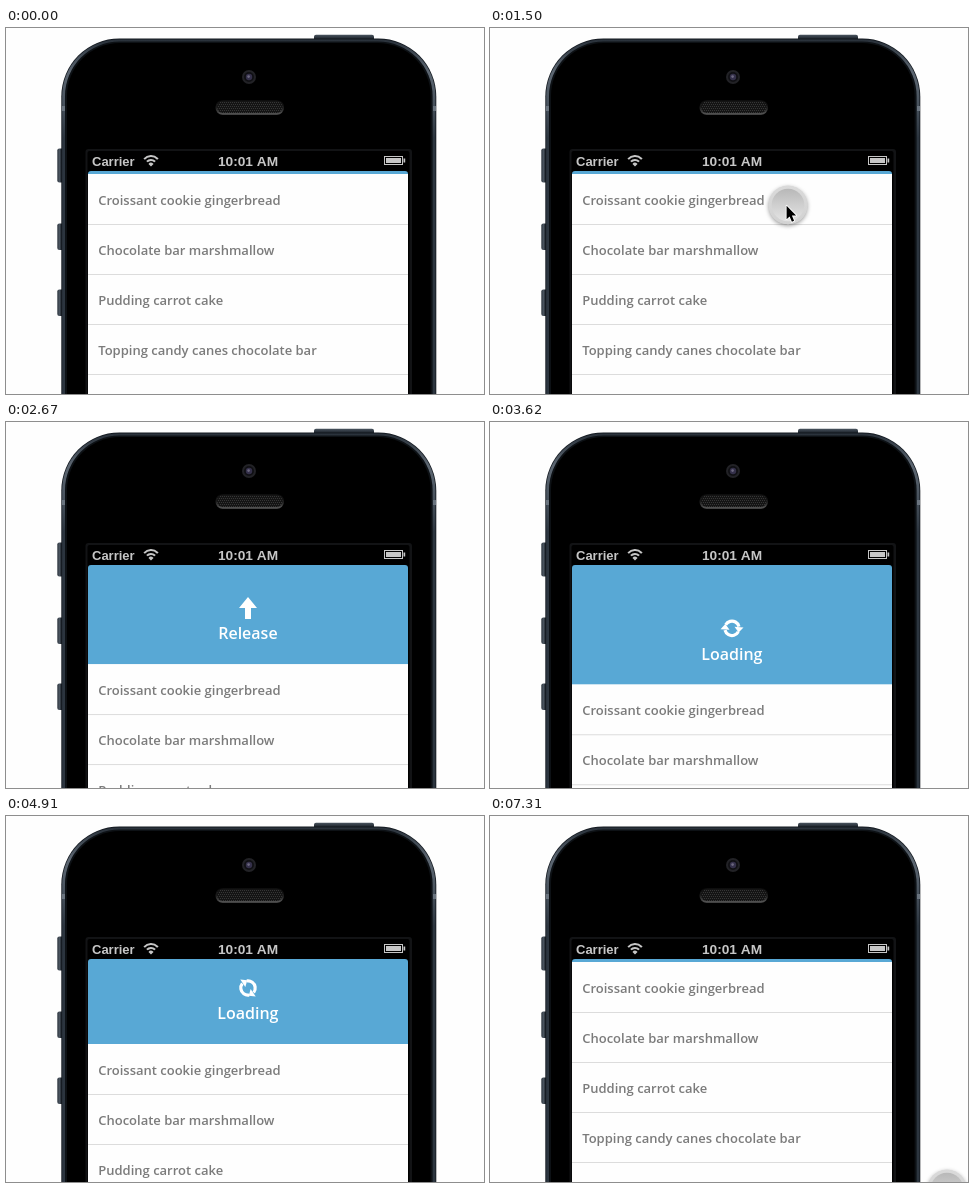
Animation of 478x366 px, one loop 7420 ms. Source, as an HTML page with a canvas:

```html
<!DOCTYPE html>
<html lang="en">
<head>
<meta charset="utf-8">
<title>Pull to refresh</title>
<style>
  html, body { margin: 0; width: 100%; height: 100%; overflow: hidden; background: #fefefe; }
  canvas { display: block; width: 478px; height: 366px; }
</style>
</head>
<body>
<canvas id="stage"></canvas>
<script>
const W = 478, H = 366, LOOP = 7420;
const BLUE = '#58a8d5', TAU = Math.PI * 2;
const REST = 82, MAX_PULL = 129.5;
const PULL = 1830, PULLED = 2900, RELEASE = 3470, CLOSE = 4980, SETTLE = 785;
const ROWS = [
  'Croissant cookie gingerbread',
  'Chocolate bar marshmallow',
  'Pudding carrot cake',
  'Topping candy canes chocolate bar',
  ''
];

const canvas = document.getElementById('stage');
const dpr = window.devicePixelRatio || 1;
canvas.width = W * dpr;
canvas.height = H * dpr;
const screenCtx = canvas.getContext('2d');
let c = screenCtx;

const clamp = (v, a = 0, b = 1) => Math.min(b, Math.max(a, v));
const mix = (a, b, p) => a + (b - a) * p;

// cubic-bezier(.25, .1, .25, 1)
function ease(x) {
  x = clamp(x);
  const curve = (a, b, s) => 3 * a * s * (1 - s) ** 2 + 3 * b * s * s * (1 - s) + s ** 3;
  let lo = 0, hi = 1;
  for (let i = 0; i < 24; i++) {
    const mid = (lo + hi) / 2;
    if (curve(0.25, 0.25, mid) < x) lo = mid; else hi = mid;
  }
  return curve(0.1, 1, lo);
}

function rounded(x, y, w, h, r, fill) {
  c.beginPath();
  c.roundRect(x, y, w, h, r);
  c.fillStyle = fill;
  c.fill();
}

function disc(x, y, r, fill) {
  c.beginPath();
  c.arc(x, y, r, 0, TAU);
  c.fillStyle = fill;
  c.fill();
}

function shape(points, fill) {
  c.beginPath();
  points.forEach(([x, y]) => c.lineTo(x, y));
  c.closePath();
  c.fillStyle = fill;
  c.fill();
}

function ramp(x0, y0, x1, y1, ...colors) {
  const g = c.createLinearGradient(x0, y0, x1, y1);
  colors.forEach((col, i) => g.addColorStop(i / (colors.length - 1), col));
  return g;
}

function write(text, x, y, font, fill, align = 'left') {
  c.font = font;
  c.fillStyle = fill;
  c.textAlign = align;
  c.fillText(text, x, y);
}

function drawButtons() {
  rounded(308, 6.8, 60, 8, 2, ramp(0, 7, 0, 11, '#48525d', '#1a2028'));
  for (const [y, h] of [[120.5, 34], [195.5, 26.5], [261.5, 26.5]])
    rounded(51.3, y, 8, h, 2, ramp(51, 0, 56, 0, '#2a323b', '#4a545f', '#10151a'));
}

function drawBody() {
  rounded(55.3, 10.6, 375, 500, 58, '#141a21');
  rounded(56.2, 11.4, 373.2, 500, 57, ramp(0, 10, 0, 110, '#262e37', '#5d6772', '#48525d', '#2c353f'));
  rounded(59, 13.6, 367.6, 500, 54.5, '#0d1115');
  rounded(61, 15, 363.6, 500, 53, '#000');
  c.fillStyle = '#6a747f';
  c.fillRect(56, 78, 3, 5);
  c.fillRect(427, 78, 3, 5);
}

function drawFace() {
  disc(243, 49, 7, '#222226');
  disc(243, 49, 5, '#101014');
  disc(243, 49, 3.2, '#34304a');
  disc(242.6, 48.6, 1.3, '#6d6880');

  rounded(209.5, 72, 68.5, 14.8, 7, ramp(0, 72, 0, 87, '#060606', '#1c1c1c', '#5c5c5c'));
  rounded(211, 72.5, 65.5, 12.5, 6, '#141414');
  c.save();
  c.beginPath();
  c.roundRect(211, 73, 65.5, 12, 6);
  c.clip();
  c.fillStyle = '#363636';
  for (let j = 0; j < 6; j++)
    for (let i = 0; i < 34; i++)
      c.fillRect(210 + i * 2 + j % 2, 74 + j * 2, 1, 1);
  c.restore();
}

function drawStatus() {
  const ink = '#c6c6c6';
  rounded(79.5, 121, 326.5, 300, 3, '#121315');
  rounded(81.5, 123, 322, 300, 2, '#000');
  const face = '"Liberation Sans", Arial, sans-serif';
  write('Carrier', 86, 137.7, 'bold 13px ' + face, ink);
  write('10:01 AM', 242, 137.7, 'bold 13.7px ' + face, ink, 'center');

  c.strokeStyle = ink;
  c.lineWidth = 2;
  for (const r of [5.6, 9.4]) {
    c.beginPath();
    c.arc(145, 137.5, r, -Math.PI * 0.76, -Math.PI * 0.24);
    c.stroke();
  }
  c.beginPath();
  c.moveTo(145, 138.5);
  c.arc(145, 138, 3.3, -Math.PI * 0.78, -Math.PI * 0.22);
  c.fillStyle = ink;
  c.fill();

  c.lineWidth = 1;
  c.strokeRect(378.5, 128.5, 18, 8);
  c.fillRect(380, 130, 15, 5);
  c.fillRect(397.5, 130.5, 1.7, 4);
}

// The phone never changes, so it is painted once.
const phone = document.createElement('canvas');
phone.width = canvas.width;
phone.height = canvas.height;
c = phone.getContext('2d');
c.scale(dpr, dpr);
c.fillStyle = '#fefefe';
c.fillRect(0, 0, W, H);
drawButtons();
drawBody();
drawFace();
drawStatus();
c = screenCtx;

function drawRefresh(angle) {
  c.rotate(angle);
  c.strokeStyle = '#fff';
  c.lineWidth = 3.2;
  for (let i = 0; i < 2; i++) {
    c.beginPath();
    c.arc(0, 0, 7.2, Math.PI * 1.14, Math.PI * 1.9);
    c.stroke();
    shape([[2.4, -1.6], [11.4, -1.6], [6.9, 3.8]], '#fff');
    c.rotate(Math.PI);
  }
}

function drawArrow(up) {
  if (up) c.rotate(Math.PI);
  shape([[-3, -11], [3, -11], [3, 0], [9, 0], [0, 11], [-9, 0], [-3, 0]], '#fff');
}

function drawHint(t, offset) {
  if (t < PULL || t >= CLOSE) return;
  const loading = t >= RELEASE, ready = offset >= REST;
  const bottom = 146 + offset;
  c.save();
  c.globalAlpha = loading ? 1 : clamp(offset / REST);
  const label = loading ? 'Loading' : ready ? 'Release' : 'Pull';
  write(label, 241.9, bottom - 24.7, '600 16px "Open Sans", sans-serif', '#fff', 'center');
  c.translate(242, bottom - 56);
  if (loading) drawRefresh((t - 3600) / 2000 * TAU);
  else drawArrow(ready);
  c.restore();
}

function drawList(t, offset) {
  c.save();
  c.beginPath();
  c.roundRect(82, 143, 320, 300, 3);
  c.clip();
  c.fillStyle = BLUE;
  c.fillRect(82, 143, 320, 300);
  drawHint(t, offset);
  c.fillStyle = '#fefefe';
  c.fillRect(82, 146 + offset, 320, 300);
  ROWS.forEach((text, i) => {
    const y = 146 + offset + i * 50;
    write(text, 92.2, y + 31, '600 13px "Open Sans", sans-serif', '#7b7b7b');
    c.fillStyle = '#dcdcdc';
    c.fillRect(82, y + 50, 320, 1);
  });
  c.restore();
}

function drawTouch(x, y, top) {
  c.save();
  c.beginPath();
  c.rect(0, top, W, H);
  c.clip();
  c.save();
  c.shadowColor = 'rgba(0,0,0,.4)';
  c.shadowBlur = 4 * dpr;
  c.shadowOffsetY = 1.5 * dpr;
  disc(x, y, 19.3, '#d8d8d8');
  c.restore();
  disc(x, y, 19.3, ramp(0, y - 20, 0, y + 20, '#dadada', '#d2d2d2'));
  disc(x, y, 16.3, ramp(0, y - 16, 0, y + 16, '#b8b8b8', '#cfcfcf', '#e4e4e4'));

  c.translate(x - 1.4, y + 0.8);
  c.beginPath();
  [[0, 0], [0, 13.4], [3, 10.6], [5.3, 16], [7.5, 15], [5.3, 9.7], [9.5, 9.7]]
    .forEach(([px, py]) => c.lineTo(px, py));
  c.closePath();
  c.lineJoin = 'round';
  c.lineWidth = 1.8;
  c.strokeStyle = '#fff';
  c.stroke();
  c.fillStyle = '#000';
  c.fill();
  c.restore();
}

function pullOffset(t) {
  if (t < PULL) return 0;
  if (t < RELEASE) return MAX_PULL * clamp((t - PULL) / (PULLED - PULL)) ** 1.24;
  if (t < CLOSE) return mix(MAX_PULL, REST, ease((t - RELEASE) / SETTLE));
  return mix(REST, 0, ease((t - CLOSE) / SETTLE));
}

function drawCursor(t, offset) {
  if (t >= 7310) return drawTouch(457, 373, 0);
  if (t < 60 || t >= RELEASE) return;
  if (t < PULL) {
    const p = 1 - (1 - clamp(t / 720)) ** 2;
    return drawTouch(mix(240, 298, p), mix(395, 177, p), t < 1500 ? 168 : 0);
  }
  drawTouch(298 - offset * 0.093, 177 + offset * 2.26, 0);
}

function frame(now) {
  const t = (now - start) % LOOP;
  const offset = pullOffset(t);
  c.setTransform(1, 0, 0, 1, 0, 0);
  c.drawImage(phone, 0, 0);
  c.scale(dpr, dpr);
  drawList(t, offset);
  drawCursor(t, offset);
  requestAnimationFrame(() => frame(performance.now()));
}

const start = performance.now();
frame(start);
</script>
</body>
</html>
```
